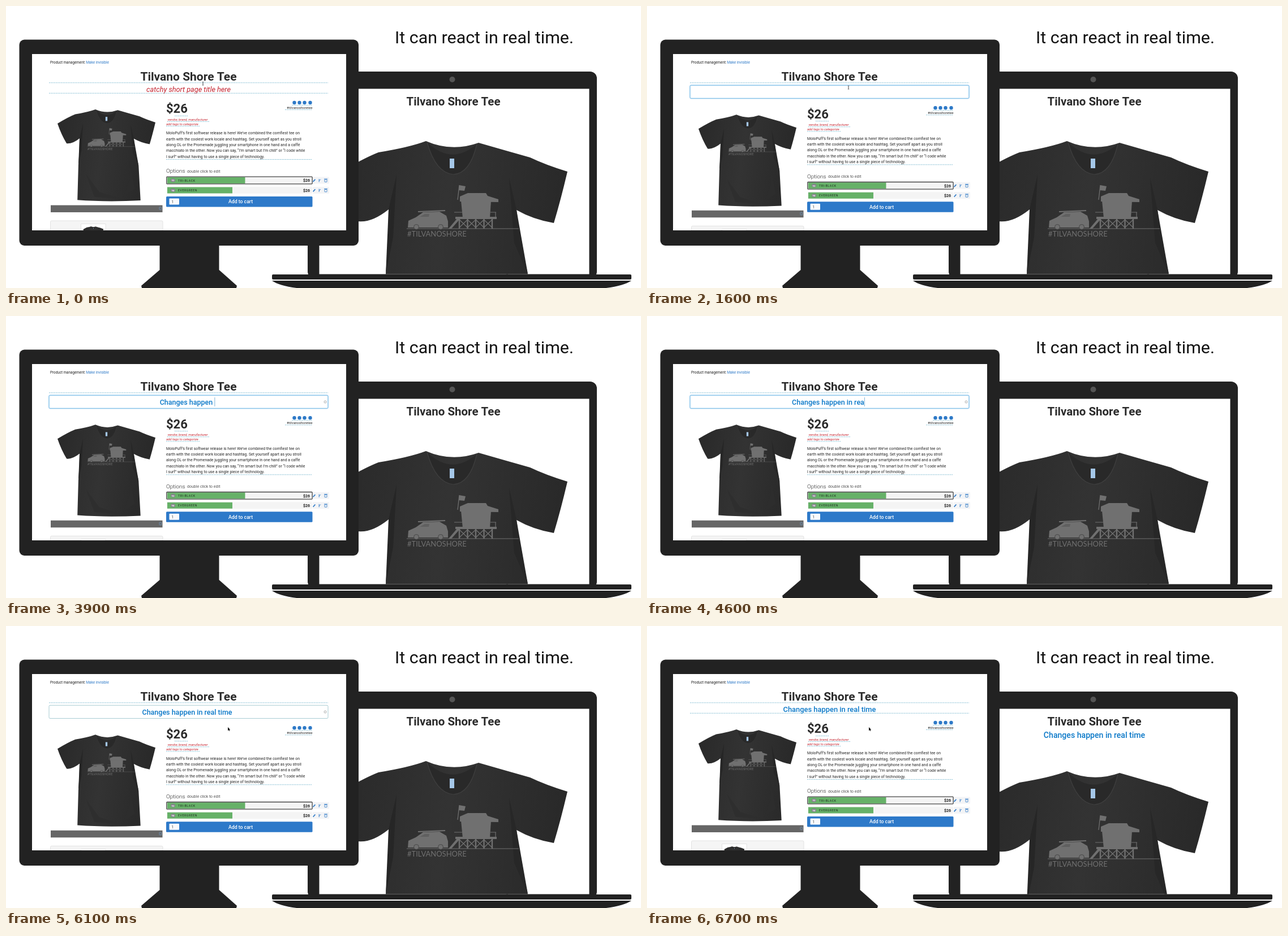
An HTML page with a canvas that plays this animation: 1122 by 499 pixels, repeating every 8700 ms.

```html
<!DOCTYPE html>
<html lang="en">
<head>
<meta charset="utf-8">
<title>Real time editing</title>
<style>
html, body { margin: 0; width: 100%; height: 100%; overflow: hidden; background: #fff; }
canvas { display: block; width: 1122px; height: 499px; }
</style>
</head>
<body>
<canvas id="stage"></canvas>
<script>
const W = 1122, H = 499, LOOP = 8700;
const canvas = document.getElementById('stage');
const ctx = canvas.getContext('2d');
const dpr = window.devicePixelRatio || 1;
canvas.width = W * dpr;
canvas.height = H * dpr;

const DARK = '#222', BLUE = '#0a78c8', LINK = '#2d79c7', RED = '#c3202c', DASH = '#7fbcd2';
const NAME = 'Tilvano Shore Tee';
const TAG = '#tilvanoshoretee';
const PHRASE = 'Changes happen in real time';
const COPY = [
  'MoloPuff’s first softwear release is here! We’ve combined the comfiest tee on',
  'earth with the coolest work locale and hashtag. Set yourself apart as you stroll',
  'along OL or the Promenade juggling your smartphone in one hand and a caffé',
  'macchiato in the other. Now you can say, “I’m smart but I’m chill” or “I code while',
  'I surf” without having to use a single piece of technology.'
];

// Key moments and typing pace in ms
const EDIT = 600, TYPE = 2100, KEY = 122, BLUR = 5800, SAVE = 6200, SYNC = 6500;

const clamp = v => Math.max(0, Math.min(1, v));
const mix = (a, b, k) => a + (b - a) * k;

function text(s, x, y, size, color, { weight = 400, align = 'left', family = 'Roboto', style = '', gap = 0 } = {}) {
  ctx.font = `${style} ${weight} ${size}px ${family}, sans-serif`;
  ctx.letterSpacing = gap + 'px';
  ctx.textAlign = align;
  ctx.fillStyle = color;
  ctx.fillText(s, x, y);
}

function box(x, y, w, h, fill, r = 0, stroke, line = 1) {
  ctx.beginPath();
  ctx.roundRect(x, y, w, h, r);
  if (fill) { ctx.fillStyle = fill; ctx.fill(); }
  if (stroke) { ctx.strokeStyle = stroke; ctx.lineWidth = line; ctx.stroke(); }
}

function poly(pts, fill) {
  ctx.beginPath();
  for (let i = 0; i < pts.length; i += 2) ctx.lineTo(pts[i], pts[i + 1]);
  ctx.closePath();
  ctx.fillStyle = fill;
  ctx.fill();
}

function seg(x1, y1, x2, y2, color, width = 1) {
  ctx.beginPath();
  ctx.moveTo(x1, y1);
  ctx.lineTo(x2, y2);
  ctx.strokeStyle = color;
  ctx.lineWidth = width;
  ctx.stroke();
}

function disc(x, y, r, fill) {
  ctx.beginPath();
  ctx.arc(x, y, r, 0, Math.PI * 2);
  ctx.fillStyle = fill;
  ctx.fill();
}

function dashes(x1, x2, y, color = DASH) {
  ctx.setLineDash([2, 1]);
  seg(x1, y, x2, y, color, 0.9);
  ctx.setLineDash([]);
}

function clipped(x, y, w, h, draw) {
  ctx.save();
  ctx.beginPath();
  ctx.rect(x, y, w, h);
  ctx.clip();
  draw();
  ctx.restore();
}

// Origin: centre of the collar top
function shirt(x, y, scale, printed = true) {
  ctx.save();
  ctx.translate(x, y);
  ctx.scale(scale, scale);

  const cloth = ctx.createLinearGradient(-200, 0, 200, 60);
  cloth.addColorStop(0, '#292929');
  cloth.addColorStop(0.5, '#333');
  cloth.addColorStop(1, '#292929');
  ctx.beginPath();
  ctx.moveTo(-46, 0);
  ctx.quadraticCurveTo(-75, 11, -130, 20);
  ctx.quadraticCurveTo(-160, 32, -204, 59);
  ctx.quadraticCurveTo(-188, 106, -166, 142);
  ctx.quadraticCurveTo(-142, 145, -112, 121);
  ctx.quadraticCurveTo(-112, 180, -117, 235);
  ctx.lineTo(-121, 378);
  ctx.quadraticCurveTo(0, 387, 142, 380);
  ctx.lineTo(134, 235);
  ctx.quadraticCurveTo(122, 185, 114, 122);
  ctx.quadraticCurveTo(144, 139, 180, 145);
  ctx.quadraticCurveTo(192, 105, 204, 54);
  ctx.quadraticCurveTo(165, 42, 138, 29);
  ctx.quadraticCurveTo(92, 16, 47, 3);
  ctx.quadraticCurveTo(0, 20, -46, 0);
  ctx.fillStyle = cloth;
  ctx.fill();

  // Folds and side shading
  poly([-112, 121, -98, 60, -104, 170, -117, 235], '#262626');
  poly([114, 122, 101, 65, 110, 180, 134, 235], '#272727');
  poly([-85, 270, -30, 345, 60, 372, -50, 365], '#2e2e2e');
  poly([95, 215, 118, 330, 70, 365, 98, 290], '#2d2d2d');

  // Collar
  ctx.beginPath();
  ctx.moveTo(-44, 2);
  ctx.quadraticCurveTo(0, 44, 44, 5);
  ctx.quadraticCurveTo(32, 58, 2, 59);
  ctx.quadraticCurveTo(-29, 56, -44, 2);
  ctx.fillStyle = '#292929';
  ctx.fill();
  ctx.beginPath();
  ctx.moveTo(-44, 2);
  ctx.quadraticCurveTo(-29, 56, 2, 59);
  ctx.quadraticCurveTo(32, 58, 44, 5);
  ctx.strokeStyle = '#3e3e3e';
  ctx.lineWidth = 1.2;
  ctx.stroke();
  box(-4, 31, 8, 17, '#a5c7e8');

  if (printed) print();
  ctx.restore();
}

function print() {
  const ink = '#707070';
  seg(-80, 155, 118, 155, ink, 1);
  // Car
  poly([-78, 153, -77, 141, -64, 135, -51, 126, -22, 125, -10, 132, -7, 142, -7, 153], ink);
  seg(-60, 125, -12, 123, ink, 2.2);
  poly([-57, 134, -48, 129, -40, 129, -41, 134], '#606060');
  for (const x of [-63, -20]) {
    disc(x, 152, 4.8, '#484848');
    disc(x, 152, 3.8, ink);
  }
  // Lifeguard tower
  poly([14, 98, 28, 92, 60, 92, 63, 97, 82, 103, 82, 108, 14, 107], ink);
  poly([16, 106, 69, 106, 67, 136, 19, 136], ink);
  box(6, 134, 73, 4, ink);
  poly([-6, 155, 10, 136, 14, 138, -1, 155], ink);
  for (let x = 13; x < 74; x += 14.5) {
    seg(x, 137, x, 155, ink, 2.4);
    if (x < 70) {
      seg(x, 139, x + 14.5, 153, ink, 1.3);
      seg(x + 14.5, 139, x, 153, ink, 1.3);
    }
  }
  seg(4, 126, 18, 126, ink, 1.2);
  seg(68, 126, 78, 126, ink, 1.2);
  seg(77, 126, 77, 135, ink, 1.2);
  // Flag
  seg(13, 78, 10, 104, ink, 1.3);
  poly([13, 78, 24, 80, 22, 88, 12, 87], ink);
  text('#TILVANOSHORE', -79, 169.3, 13, ink, { family: 'Lato' });
}

function laptop(synced) {
  box(533, 116, 511, 366, DARK, 12);
  box(553.5, 146.5, 477, 328, '#fff');
  disc(788.5, 130, 5, '#555');
  clipped(553.5, 146.5, 477, 328, () => {
    shirt(788, synced ? 257 : 239, 1);
    text(NAME, 790.5, 175.5, 20.5, '#2b2b2b', { weight: 700, align: 'center' });
    if (synced) text(PHRASE, 790.5, 198, 14.1, BLUE, { weight: 500, align: 'center' });
  });
  box(470, 475, 635, 9, DARK, 2);
  box(469, 484, 637, 2, '#fff');
  ctx.beginPath();
  ctx.moveTo(470, 486);
  ctx.lineTo(1105, 486);
  ctx.quadraticCurveTo(1090, 496, 1052, 500);
  ctx.lineTo(522, 500);
  ctx.quadraticCurveTo(484, 496, 470, 486);
  ctx.fillStyle = DARK;
  ctx.fill();
}

function monitor() {
  poly([271.5, 420, 376.5, 420, 376.5, 467, 408, 495, 407, 499, 240, 499, 239, 495, 271.5, 467], DARK);
  box(23.5, 59.5, 599.5, 364.5, DARK, 9);
  box(46, 85, 555, 312, '#fff');
}

function option(y, label, count, green, chosen) {
  box(284, y, 257, 12, '#f4f4f4', 1);
  box(285, y + 0.5, green - 285, 11, '#66b168');
  if (chosen) box(283.7, y - 0.3, 257.4, 12.6, null, 1, '#444', 1.3);
  box(291, y + 3, 8, 6, '#85818c', 3);
  text(count, 295, y + 7.8, 4.2, '#fff', { align: 'center', weight: 700 });
  text(label, 304, y + 8, 5.2, '#1d2b1f', { gap: 0.6 });
  text('$26', 537, y + 8.8, 7, '#222', { weight: 700, align: 'right' });
  box(542, y, 29, 12, '#f3f4f6', 1);
  // Edit, branch and delete icons
  const c = y + 6;
  seg(542.6, c + 2.4, 546.4, c - 1.8, LINK, 1.7);
  seg(553.2, c - 2.5, 553.2, c + 3, LINK, 0.9);
  seg(553.2, c + 1, 556, c - 2, LINK, 0.9);
  box(563, c - 1.5, 4, 4.4, null, 0.5, LINK, 0.8);
  seg(562, c - 2.4, 568, c - 2.4, LINK, 0.9);
}

function details() {
  shirt(177.5, 183, 0.424);
  box(79, 352.5, 197.5, 12.5, '#666');
  box(271, 355.8, 3.6, 4.6, null, 0.5, '#6f91b5', 0.9);
  box(78.5, 380, 198.5, 60, '#f5f5f5', 2, '#ddd', 0.8);
  box(132.5, 385.5, 43.5, 40, '#fff', 0, '#ddd', 0.8);
  shirt(154.3, 390, 0.088, false);

  text('$26', 283, 189.3, 22, '#2b2b2b', { weight: 700 });
  dashes(298, 321, 194.5);
  text('vendor, brand, manufacturer', 285.5, 202.6, 5.9, RED, { style: 'italic' });
  dashes(285, 360, 204.5);
  text('add tags to categorize', 283, 211, 5.9, RED, { style: 'italic' });
  dashes(283, 343, 212.6);

  for (const x of [509.5, 518.5, 527.5, 537.5]) disc(x, 171, 3.2, LINK);
  dashes(505, 541, 175.5);
  text(TAG, 541.5, 181.5, 6.1, '#222', { align: 'right' });
  dashes(493, 541, 183.5);

  COPY.forEach((s, i) => text(s, 283, 227.2 + i * 10.4, 6.8, '#222', { gap: 0.04 }));
  dashes(283, 541, 271.5);

  text('Options', 283, 295.2, 9.9, '#222', { weight: 300 });
  text('double click to edit', 320, 295, 7, '#555');
  option(302.5, 'TRI-BLACK', '93', 422.5, true);
  option(320, 'EVERGREEN', '94', 400, false);
  box(283, 337, 258.5, 18.5, '#2d79c9', 1.5);
  box(288.5, 340.5, 17.5, 11, '#f7f9fc', 1);
  text('1', 292.5, 348.5, 6.5, '#444');
  text('Add to cart', 414.5, 349.2, 8.7, '#fff', { weight: 500, align: 'center' });
}

function field(t) {
  const focused = t < BLUR;
  ctx.save();
  if (focused) {
    ctx.shadowColor = 'rgba(82,168,236,.45)';
    ctx.shadowBlur = 2 * dpr;
  }
  box(76, 140.3, 493, 23.2, '#fff', 2, focused ? '#7dbde6' : '#a9ccd3', 1);
  ctx.restore();

  const count = Math.floor((t - TYPE) / KEY) + 1;
  if (count < 1) return;
  const typed = PHRASE.slice(0, count);
  ctx.font = '500 12.5px Roboto, sans-serif';
  ctx.letterSpacing = '0px';
  const half = ctx.measureText(typed).width / 2;
  text(typed, 320 - half, 156.5, 12.5, BLUE, { weight: 500 });
  if (focused) seg(320.5 + half, 144, 320.5 + half, 160, '#7fb4d8', 1);
  ctx.beginPath();
  ctx.arc(564, 152, 2, 0, Math.PI * 2);
  ctx.strokeStyle = '#aaa';
  ctx.lineWidth = 1;
  ctx.stroke();
}

function pointer(t) {
  if (t >= TYPE && t < 5500) return;
  const a = clamp((t - 100) / 900), b = clamp((t - 5500) / 400);
  const x = mix(mix(348, 356, a), 392, b);
  const y = mix(mix(137, 144, a), 179, b);
  if (y > 164) {
    poly([x, y, x, y + 6.2, x + 1.5, y + 5, x + 2.5, y + 7, x + 3.5, y + 6.5, x + 2.6, y + 4.6, x + 4.3, y + 4.4], '#111');
  } else {
    seg(x, y - 2.5, x, y + 3, '#333', 0.9);
    seg(x - 1.3, y - 2.8, x + 1.3, y - 2.8, '#555', 0.7);
    seg(x - 1.3, y + 3.2, x + 1.3, y + 3.2, '#555', 0.7);
  }
}

function page(t) {
  const editing = t >= EDIT && t < SAVE;
  text('Product management:', 78, 102.3, 6.3, '#222');
  text('Make invisible', 141.5, 102.3, 6.4, LINK);
  text(NAME, 322.5, 131.8, 21, '#2b2b2b', { weight: 700, align: 'center' });
  dashes(76, 569, 135.8);
  if (editing) {
    field(t);
  } else {
    if (t < EDIT) text('catchy short page title here', 322.5, 151.6, 12.7, RED, { style: 'italic', align: 'center' });
    else text(PHRASE, 322.5, 151.6, 12.9, BLUE, { weight: 500, align: 'center' });
    dashes(76, 569, 154.3);
  }
  ctx.save();
  ctx.translate(0, editing ? 9.3 : 0);
  details();
  ctx.restore();
  pointer(t);
}

function draw(now) {
  const t = Math.floor((now % LOOP) / 100) * 100;
  ctx.setTransform(dpr, 0, 0, dpr, 0, 0);
  box(0, 0, W, H, '#fff');
  laptop(t >= SYNC);
  monitor();
  clipped(46, 85, 555, 312, () => page(t));
  text('It can react in real time.', 687, 65.8, 30.4, '#111');
}

let start;
function frame(now) {
  start ??= now;
  draw(now - start);
  requestAnimationFrame(frame);
}
requestAnimationFrame(frame);
</script>
</body>
</html>
```
